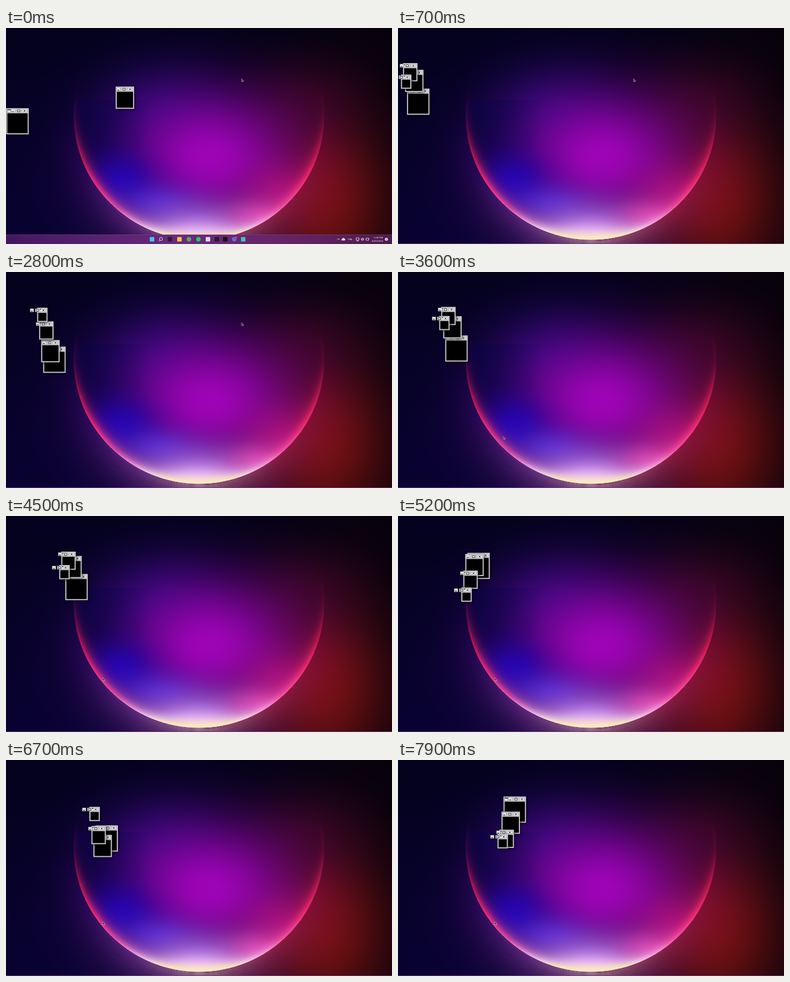
An HTML page with a canvas that plays this animation: 690x388 px, repeating every 8000 ms.

```html
<!DOCTYPE html>
<html lang="en">
<head>
<meta charset="utf-8">
<title>Window snake</title>
<style>
  html, body { margin: 0; width: 100%; height: 100%; overflow: hidden; background: #04021c; }
  canvas, svg { position: absolute; left: 0; top: 0; width: 690px; height: 388px; display: block; }
  .win { filter: drop-shadow(1px 1.5px 2px rgba(0, 0, 0, .75)); }
  text { font-family: "Open Sans", sans-serif; font-size: 4.3px; fill: #fff; text-anchor: middle; }
</style>
</head>
<body>
<canvas id="sky" width="690" height="388"></canvas>
<svg id="stage" viewBox="0 0 690 388">
  <g id="bar">
    <defs>
      <linearGradient id="barFill">
        <stop offset="0" stop-color="#43185f"/>
        <stop offset=".45" stop-color="#6a2a7c"/>
        <stop offset=".75" stop-color="#642463"/>
        <stop offset="1" stop-color="#4c1a4c"/>
      </linearGradient>
    </defs>
    <rect y="371" width="690" height="17" fill="url(#barFill)"/>
    <rect y="371" width="690" height=".6" fill="#8a5a94" opacity=".6"/>
    <g id="apps"></g>
    <g fill="none" stroke="#fff" stroke-width=".8">
      <circle cx="277" cy="379" r="2.8"/>
      <path d="M275 381.2l-2 2.2M592 380.5l2.2-2.2 2.2 2.2"/>
      <path d="M626 377h5v4h-5zM627 382.5h3M635 378.5h1.2l1.6-1.5v5l-1.6-1.5h-1.2zM639 378q1.4 1.5 0 3M643.5 377.5h5v3.6h-5z"/>
    </g>
    <path d="M600.5 381.5a1.5 1.5 0 0 1 .6-2.8a2.2 2.2 0 0 1 4-.2a1.6 1.6 0 0 1 .4 3z" fill="#fff"/>
    <text x="615" y="381.3">FRA</text>
    <text x="666" y="378">6:40 PM</text>
    <text x="664" y="384">4/20/2022</text>
    <circle cx="680" cy="379.5" r="2.7" fill="#e8dcec"/>
    <text x="680" y="381" style="fill:#402048">2</text>
  </g>
  <g id="wins"></g>
  <path id="arrow" d="M0 0V5.2L1.3 4.1L2.2 6L3 5.6L2.2 3.8H3.8Z" fill="#111" stroke="#d6d6c4" stroke-width=".6"/>
</svg>
<script>
const LOOP = 8000, TICK = 100;
const STEP = 150, LEAD = 110, LAG = 4;
const PX = 690 / 1920;
const $ = id => document.getElementById(id);

function add(parent, tag, attrs) {
  const el = document.createElementNS("http://www.w3.org/2000/svg", tag);
  for (const k in attrs) el.setAttribute(k, attrs[k]);
  return parent.appendChild(el);
}

function paintSky() {
  const c = $("sky").getContext("2d");
  const cx = 345, cy = 156, R = 224.5;

  function fillStops(g, stops) {
    stops.forEach(([at, col]) => g.addColorStop(at, col));
    return g;
  }
  const ramp = (x0, y0, x1, y1, stops) => fillStops(c.createLinearGradient(x0, y0, x1, y1), stops);

  // soft elliptical light with a gaussian falloff
  function glow(x, y, rx, ry, rgb, alpha) {
    const g = c.createRadialGradient(0, 0, 0, 0, 0, 1.25);
    for (let i = 0; i <= 16; i++) {
      const u = i / 16;
      const a = alpha * Math.exp(-5.5 * u * u) * (1 - u ** 6);
      g.addColorStop(u, `rgba(${rgb},${a})`);
    }
    c.save();
    c.translate(x, y);
    c.scale(rx, ry);
    c.fillStyle = g;
    c.fillRect(-1.25, -1.25, 2.5, 2.5);
    c.restore();
  }

  // nested rings from the planet's edge: dir 1 outwards, -1 inwards and upwards
  function rings(dir, count, decay, alpha, width) {
    c.lineWidth = width;
    for (let k = count; k >= 0; k--) {
      c.globalAlpha = alpha * Math.exp(-k / decay);
      c.beginPath();
      c.arc(cx, dir < 0 ? cy - k : cy, R + dir * (k + 1), -.2, Math.PI + .2);
      c.stroke();
    }
    c.globalAlpha = 1;
  }

  c.fillStyle = ramp(0, 0, 0, 388, [[0, "#04021c"], [.5, "#060228"], [1, "#090232"]]);
  c.fillRect(0, 0, 690, 388);
  c.fillStyle = ramp(340, 0, 690, 0, [[0, "rgba(8,2,10,0)"], [.8, "rgba(8,2,10,.8)"], [1, "rgba(6,1,8,.9)"]]);
  c.fillRect(0, 0, 690, 388);
  glow(570, 310, 215, 280, "122,18,10", .9);
  glow(540, 130, 190, 130, "66,6,34", .5);
  glow(270, 150, 200, 150, "40,12,135", .6);
  glow(365, 232, 290, 215, "164,4,188", .96);

  c.strokeStyle = fillStops(c.createConicGradient(0, cx, cy), [
    [0, "rgba(130,10,20,0)"], [.07, "rgba(150,18,40,.5)"], [.15, "rgba(170,50,70,.85)"],
    [.25, "rgba(220,170,170,1)"], [.33, "rgba(140,70,160,.9)"], [.42, "rgba(70,20,130,.6)"],
    [.5, "rgba(50,10,110,0)"], [1, "rgba(130,10,20,0)"]]);
  rings(1, 110, 32, .62, 1.2);

  c.save();
  c.beginPath();
  c.arc(cx, cy, R, 0, 7);
  c.clip();
  c.fillStyle = ramp(120, 0, 260, 0, [[0, "rgba(12,3,64,.75)"], [1, "rgba(12,3,90,0)"]]);
  c.fillRect(120, 130, 140, 258);
  glow(205, 275, 115, 90, "36,4,190", .85);
  glow(490, 300, 120, 95, "205,22,150", .6);
  glow(270, 315, 130, 65, "84,44,232", .65);
  glow(345, 366, 200, 92, "196,136,250", .9);
  glow(450, 340, 100, 55, "245,80,200", .65);
  glow(345, 380, 190, 45, "255,212,240", .9);

  // lit rim, thickest at the bottom
  c.strokeStyle = ramp(0, 110, 0, 381, [
    [0, "rgba(120,10,70,0)"], [.2, "rgba(150,16,80,.2)"], [.42, "rgba(240,32,92,.6)"],
    [.62, "#ff2f78"], [.78, "#ff58a8"], [.87, "#ffa0e0"], [.93, "#ffdcec"], [.955, "#fff0b8"], [1, "#fff2b0"]]);
  rings(-1, 30, 5.2, .85, 2.6);
  c.restore();
}

function buildApps() {
  const apps = [
    [261, "#4cc2f0", 0], [293, "#26222e", 0], [310, "#f4c544", 0], [327, "#4fae64", 1],
    [344, "#1ed05c", 1], [361, "#d8dce4", 0], [377, "#241c2c", 0], [392, "#17131c", 0],
    [408, "#5a6cf0", 1], [424, "#3cc8b8", 0]];
  for (const [x, fill, round] of apps)
    add($("apps"), "rect", { x: x - 4, y: 375.5, width: 8, height: 8, rx: round ? 4 : .8, fill });
  add($("apps"), "circle", { cx: 411.5, cy: 376.3, r: 1.9, fill: "#e83a48" });
}

function buildWindow(i) {
  const w = (112 - 20 * i) * PX, h = (131 - 20 * i) * PX;
  const g = add($("wins"), "g", { class: "win" });
  const box = (x, y, width, height, fill, more) =>
    add(g, "rect", { x, y, width, height, fill, ...more });
  const line = (d, width = .9) =>
    add(g, "path", { d, fill: "none", stroke: "#181818", "stroke-width": width });

  box(0, 0, w, h, "#c4c3c7");
  box(.3, .3, w - .6, 8.4, "#cac8ce");
  box(2, 9.2, w - 4, h - 11.2, "#000");
  box(2, 2, 6, 5.6, "#fff", { stroke: "#444", "stroke-width": .5 });
  box(2.4, 2.2, 5.2, 1.6, "#333");
  const [min, max, close] = [28, 18, 7.4].map(d => w - d);
  for (const [x, half] of [[min, 3.2], [max, 4.2], [close, 4.2]])
    box(x - half, 1.8, 2 * half, 5.8, "#e8e7ea", { stroke: "#96949a", "stroke-width": .5 });
  line(`M${min - 1.8} 6.1h3`, 1.1);
  line(`M${max - 2.3} 3h4.6v3.5h-4.6z`, .8);
  line(`M${close - 1.6} 3.1l3.2 3.2m0-3.2l-3.2 3.2`, 1);
  return g;
}

// resting spots before the first step; the two smallest are not open yet
const START = [[.4, 144], [196, 105.3]];

// windows step one after another, each a step behind the one before
function place(el, i, t) {
  const n = Math.floor((t + LEAD - LAG * i) / STEP);
  const k = n - i;
  const pos = n > 0 ? [10 * k * PX - 1.9, 98.6 + 100 * PX * Math.cos(k)] : START[i];
  el.style.display = pos ? "" : "none";
  if (pos) el.setAttribute("transform", `translate(${pos[0]} ${pos[1]})`);
}

const PATH = [[0, 421, 91], [3000, 421, 91], [3600, 188, 295], [3800, 173, 291], [LOOP, 173, 291]];

function cursorAt(t) {
  const j = PATH.findIndex(p => p[0] > t);
  const [t0, x0, y0] = PATH[j - 1], [t1, x1, y1] = PATH[j];
  const u = (t - t0) / (t1 - t0), e = u * u * (3 - 2 * u);
  return [x0 + (x1 - x0) * e, y0 + (y1 - y0) * e];
}

paintSky();
buildApps();
const wins = [0, 1, 2, 3].map(buildWindow);

function draw() {
  const t = Math.floor(performance.now() % LOOP / TICK) * TICK;
  wins.forEach((el, i) => place(el, i, t));
  const [x, y] = cursorAt(t);
  $("arrow").setAttribute("transform", `translate(${x} ${y})`);
  const hide = Math.min(1, Math.max(0, (t - 400) / 300));
  $("bar").setAttribute("transform", `translate(0 ${16 * hide * hide})`);
  requestAnimationFrame(draw);
}
draw();
</script>
</body>
</html>
```
